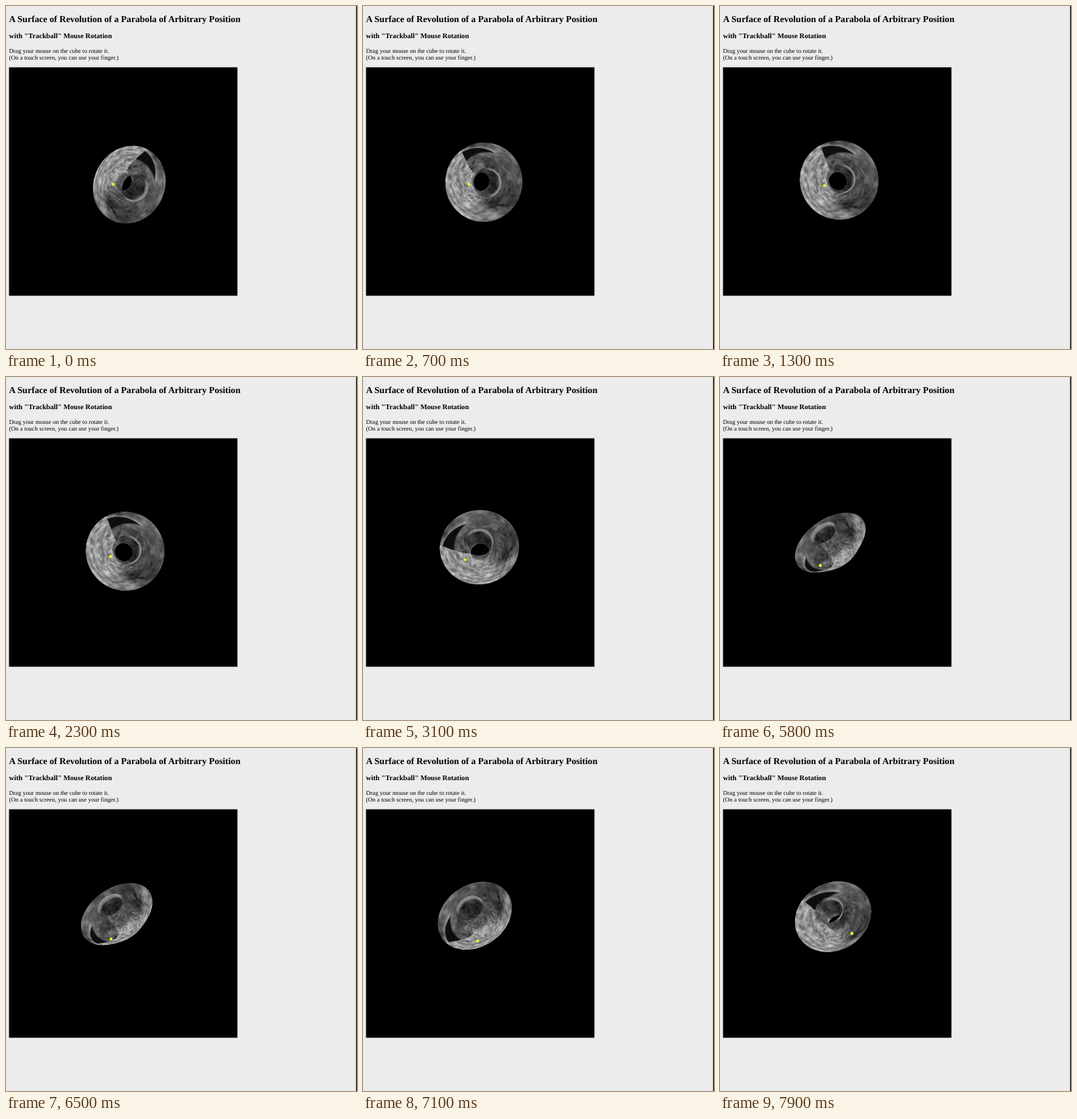
An HTML page with a canvas for the animation above (8000 ms loop, 524x512 px).

```html
<!DOCTYPE html>
<html lang="en">
<head>
<meta charset="utf-8">
<title>Surface of Revolution</title>
<style>
  html, body { margin: 0; width: 100%; height: 100%; overflow: hidden; background: #ececec; }
  svg, canvas { position: absolute; display: block; }
  svg { left: 0; top: 0; }
  canvas { left: 108px; top: 196px; width: 134px; height: 134px; }
  text { font-family: "Liberation Serif", "Times New Roman", serif; text-rendering: geometricPrecision; }
  .bold { font-weight: bold; }
</style>
</head>
<body>
<svg width="524" height="512" viewBox="0 0 524 512">
  <rect width="524" height="512" fill="#ececec"/>
  <rect x="522.7" width="1.3" height="512"/>
  <rect x="4.5" y="91.5" width="341" height="341"/>
  <text class="bold" x="4.5" y="24" font-size="13.63">A Surface of Revolution of a Parabola of Arbitrary Position</text>
  <text class="bold" x="4.5" y="48.3" font-size="10.64">with "Trackball" Mouse Rotation</text>
  <text x="4.5" y="70" font-size="9.1">Drag your mouse on the cube to rotate it.</text>
  <text x="4.5" y="80.2" font-size="9.1">(On a touch screen, you can use your finger.)</text>
</svg>
<canvas id="view" width="268" height="268"></canvas>
<svg width="524" height="512" viewBox="0 0 524 512">
  <circle id="dot" r="2.2" fill="#f2f21c"/>
</svg>
<script>
const LOOP = 8000, STEP = 100;
const SIZE = 268, SCALE = 2, LEFT = 108, TOP = 196;
const CX = 175, CY = 262;
const NU = 1200, NT = 420;

// A pose: axis direction on screen, spin in degrees, pointer position.
const pose = (ax, ay, spin, x, y) => ({ ax, ay, spin, x, y });
const first = pose(.404, .206, -63, 160, 266);
const tilted = pose(-.46, -.66, -249, 148, 279);
const drags = [
  { from: 200, to: 700, end: pose(.24, .042, -126, 158, 266) },
  { from: 700, to: 1300, end: pose(.13, -.09, -118, 156, 268) },
  { from: 2500, to: 3400, end: pose(-.146, -.478, -205, 151, 275) },
  { from: 3400, to: 3800, end: tilted },
  { from: 5400, to: 6300, end: { ...tilted, x: 152, y: 284 } },
  { from: 6300, to: 7100, end: pose(-.36, -.516, -225, 171, 288) },
  { from: 7100, to: 7900, end: pose(-.275, -.455, -147, 197, 277) }
];

const mix = (a, b, f) => a + (b - a) * f;
const clamp = (x, lo, hi) => Math.min(hi, Math.max(lo, x));
const smooth = (a, b, x) => {
  const k = clamp((x - a) / (b - a), 0, 1);
  return k * k * (3 - 2 * k);
};

function poseAt(time) {
  const now = { ...first };
  for (const { from, to, end } of drags) {
    const f = clamp((time - from) / (to - from), 0, 1);
    for (const k in now) now[k] = mix(now[k], end[k], f);
  }
  return now;
}

function hash(x, y) {
  let h = Math.imul(x, 374761393) + Math.imul(y, 668265263) | 0;
  h = Math.imul(h ^ h >>> 13, 1274126177);
  return ((h ^ h >>> 16) >>> 0) / 4294967296;
}

function noise(x, y) {
  const i = Math.floor(x), j = Math.floor(y);
  const a = smooth(0, 1, x - i), b = smooth(0, 1, y - j);
  return mix(mix(hash(i, j), hash(i + 1, j), a), mix(hash(i, j + 1), hash(i + 1, j + 1), a), b);
}

const fbm = (x, y) =>
  .55 * noise(x, y) + .28 * noise(x * 2 + 17, y * 2 + 5) + .17 * noise(x * 4 + 41, y * 4 + 9);

// Grey of the rocky skin: u runs around the axis, t along the parabola.
function skin(u, t) {
  const light = smooth(.46, .74, u);
  const warp = 1.4 * noise(u * 9, t * 7);
  const grain = fbm(u * 40 + warp, t * 34 + warp) - .5;
  const patch = fbm(u * 9 + 7, t * 6 + warp) - .5;
  let g = 84 + 62 * light + (80 + 80 * light) * grain + (120 - 60 * light) * patch;
  g *= 1 - .4 * smooth(.34, .22, t);
  // Bright lip on part of the inner tube.
  g += 85 * smooth(.05, .02, t) * smooth(.05, .15, u) * smooth(.6, .5, u);
  // Dark sliver beside the seam, with a bright limb on its outer side.
  const limb = .975 - .45 * u, inner = .82 + .5 * u;
  const shade = smooth(inner - .02, inner + .01, t) * smooth(limb, limb - .008, t);
  g = mix(g, 14, shade);
  g += 50 * smooth(limb - .006, limb + .004, t) * smooth(limb + .045, limb, t) * smooth(.2, .14, u);
  return clamp(g, 8, 225);
}

// The profile is a quadratic curve through (radius, height) points.
const bend = (a, b, c, t) => mix(mix(a, b, t), mix(b, c, t), t);
const radius = new Float32Array(NT), height = new Float32Array(NT);
for (let j = 0; j < NT; j++) {
  const t = j / (NT - 1);
  radius[j] = bend(21.5, -4.5, 59, t);
  height[j] = bend(44, -45, 22.5, t);
}

const greys = new Uint8Array(NU * NT);
for (let i = 0; i < NU; i++)
  for (let j = 0; j < NT; j++) greys[i * NT + j] = skin(i / NU, j / (NT - 1));

const ctx = document.getElementById("view").getContext("2d");
const dot = document.getElementById("dot");
const image = ctx.createImageData(SIZE, SIZE);
const pixels = new Uint32Array(image.data.buffer);
const depth = new Float32Array(SIZE * SIZE);

function drawSurface({ ax, ay, spin }) {
  const sin = Math.hypot(ax, ay) || 1e-6, cos = Math.sqrt(1 - sin * sin);
  const dx = ax / sin, dy = ay / sin;
  pixels.fill(0xff000000);
  depth.fill(-1e9);
  for (let i = 0; i < NU; i++) {
    const angle = spin * Math.PI / 180 + i / NU * 2 * Math.PI;
    const px = Math.cos(angle), py = Math.sin(angle);
    const along = px * dx + py * dy, across = py * dx - px * dy;
    for (let j = 0; j < NT; j++) {
      const r = radius[j], z = height[j];
      const a = r * along * cos + z * sin, b = r * across;
      const x = (CX + a * dx - b * dy - LEFT) * SCALE | 0;
      const y = (CY + a * dy + b * dx - TOP) * SCALE | 0;
      if (x < 0 || y < 0 || x >= SIZE || y >= SIZE) continue;
      const at = y * SIZE + x, near = z * cos - r * along * sin;
      if (near > depth[at]) {
        depth[at] = near;
        pixels[at] = 0xff000000 | greys[i * NT + j] * 0x010101;
      }
    }
  }
  ctx.putImageData(image, 0, 0);
}

const start = performance.now();
let shown = -1;
function tick() {
  const now = performance.now() - start;
  const time = Math.floor(now % LOOP / STEP) * STEP;
  if (time !== shown) {
    const p = poseAt(time);
    drawSurface(p);
    dot.setAttribute("cx", p.x);
    dot.setAttribute("cy", p.y);
    shown = time;
  }
  requestAnimationFrame(tick);
}
tick();
</script>
</body>
</html>
```
